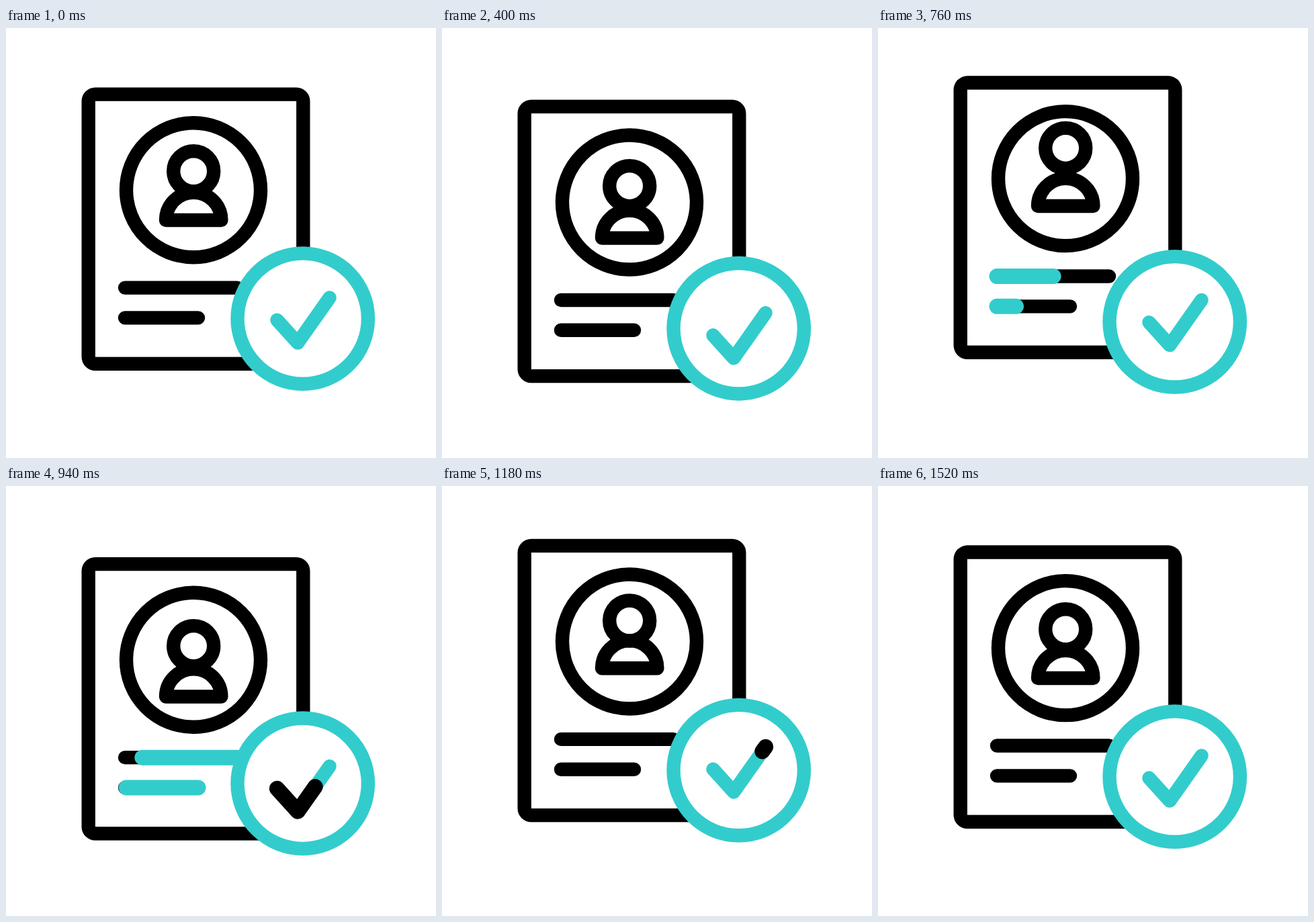
Write an HTML page that moves like this. It is 640x640 px and loops after 1660 ms.

```html
<!DOCTYPE html>
<html lang="en">
<head>
<meta charset="utf-8">
<title>Verified profile</title>
<style>
  html, body { margin: 0; width: 100%; height: 100%; overflow: hidden; background: #fff; }
  svg { display: block; width: 100%; height: 100%; }
  .ink, .teal { fill: none; stroke-width: 20.4; stroke-linecap: round; stroke-linejoin: round; }
  .ink { stroke: #000; }
  .teal { stroke: #33cccc; }
  .sweep { stroke-width: 23; }
</style>
</head>
<body>
<svg viewBox="0 0 640 640">
  <g id="card">
    <rect x="112.5" y="88.4" width="340" height="421.6" rx="20.4"/>
    <rect x="132.9" y="108.8" width="299.2" height="380.8" fill="#fff"/>
    <circle class="ink" cx="279" cy="241.2" r="100"/>
    <path class="ink" d="M177 386.6H344M177 431.4H286"/>
    <path id="long" class="teal sweep" pathLength="100" d="M177 386.6H344"/>
    <path id="short" class="teal sweep" pathLength="100" d="M177 431.4H286"/>
  </g>
  <circle id="head" class="ink" cx="279.2" cy="213.3" r="30"/>
  <path id="body" class="ink" d="M238 286A41.2 41.2 0 0 1 320.4 286Z"/>
  <circle id="badge" class="teal" style="fill:#fff" cx="441.7" cy="432.6" r="97.2"/>
  <g id="check">
    <path class="teal" d="M403.4 434.6L434.2 468.6L481.6 401.4"/>
    <path id="tick" class="ink sweep" pathLength="100" d="M403.4 434.6L434.2 468.6L481.6 401.4"/>
  </g>
</svg>
<script>
  const LOOP = 1660, STEP = 20, START = 200, REST = 1533, SWEEP = 233;
  const el = id => document.getElementById(id);

  // Turning points of the bounce: down, up, down, up
  const cardBeat = [433, 656, 905, 1133];
  const badgeBeat = [353, 605, 838, 1105];

  function ease(t, a, b) {
    const x = Math.min(1, Math.max(0, (t - a) / (b - a)));
    return x * x * (3 - 2 * x);
  }

  // Sink by low, rise by high, sink again, then settle from a smaller rise
  function bounce(id, t, beat, lag, low, high) {
    const times = [START, ...beat.map(b => b + lag), REST];
    const stops = [0, low, -high, low, -0.52 * low, 0];
    let y = 0;
    for (let i = 1; i < stops.length; i++)
      y += (stops[i] - stops[i - 1]) * ease(t, times[i - 1], times[i]);
    el(id).setAttribute("transform", `translate(0 ${y.toFixed(2)})`);
  }

  // A coloured stroke grows along the path; its tail follows after a gap
  function sweep(id, t, from, gap) {
    const end = 100 * ease(t, from, from + SWEEP);
    const start = 100 * ease(t, from + gap, from + gap + SWEEP);
    const style = el(id).style, len = end - start;
    style.display = len > 0.01 ? "" : "none";
    style.strokeDasharray = len + " 300";
    style.strokeDashoffset = -start;
  }

  function draw(t) {
    bounce("card", t, cardBeat, 0, 19.4, 39.2);
    bounce("body", t, cardBeat, 10, 29, 44.5);
    bounce("head", t, cardBeat, 25, 25, 53);
    bounce("badge", t, badgeBeat, 0, 20, 38.5);
    bounce("check", t, badgeBeat, 10, 27, 46.5);
    sweep("long", t, 643, 239);
    sweep("short", t, 682, 239);
    sweep("tick", t, 790, 193);
  }

  let origin;
  function frame(now) {
    origin ??= now;
    const t = (now - origin) % LOOP;
    draw(Math.floor(t / STEP + 1e-6) * STEP);
    requestAnimationFrame(frame);
  }
  draw(0);
  requestAnimationFrame(frame);
</script>
</body>
</html>
```
